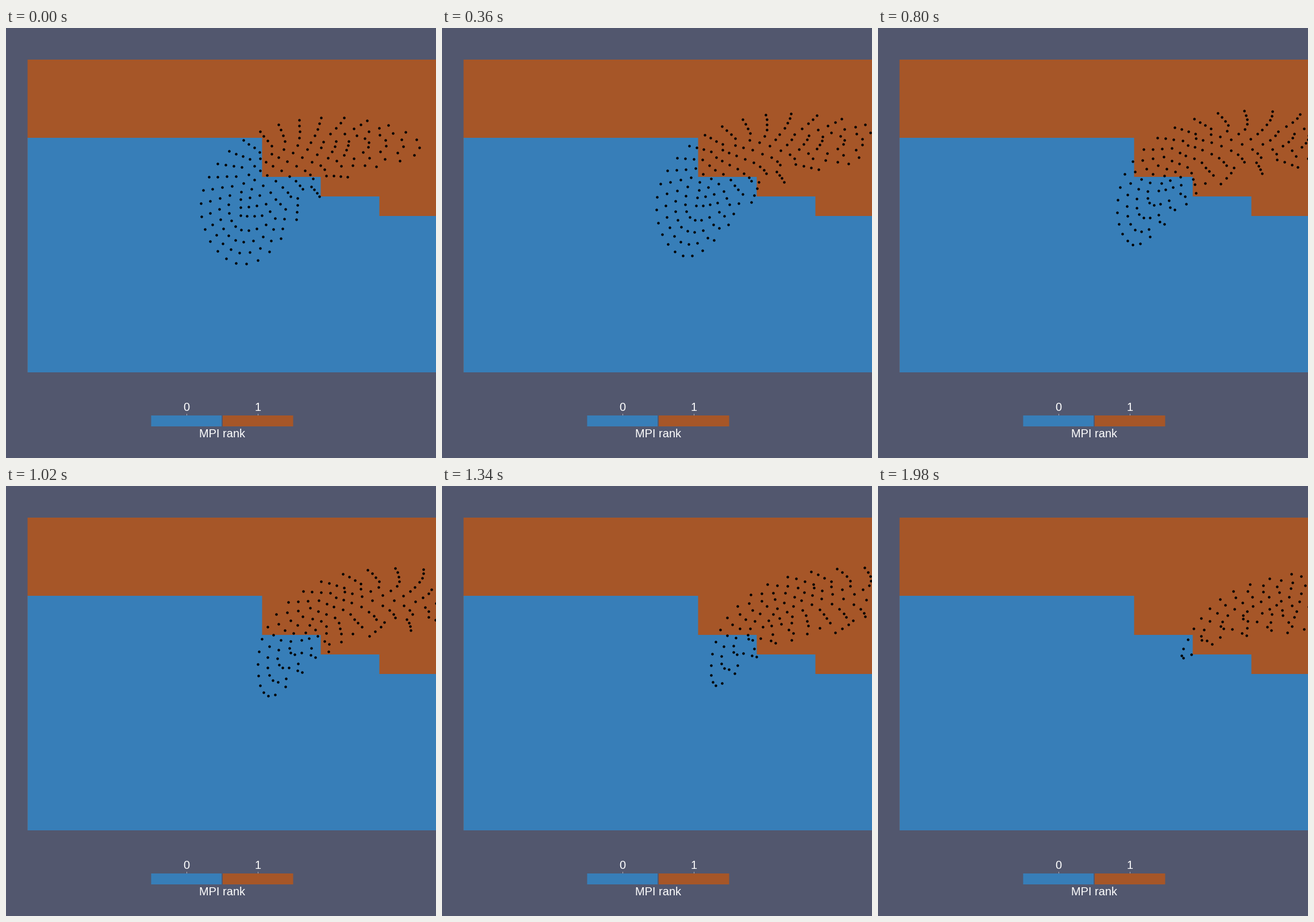
Recreate the animation shown at these times as a matplotlib script. Size 748 by 748 pixels, loop 8000 ms.

```python
import numpy as np
import matplotlib.pyplot as plt
from matplotlib.animation import FuncAnimation
from matplotlib.patches import Polygon, Rectangle

SIZE, DPI = 748, 100
STEP_MS, LOOP_MS, MOVING = 20, 8000, 100
SLATE, BLUE, BROWN = "#52576e", "#377eb8", "#a65628"
LEFT, TOP, CELL = 37.5, 55, 34


def flow(z):
    """Velocity in pixels per step: a channel that narrows to the right."""
    x, y = z.real, z.imag
    peak = 3.12 + 1.05 * np.tanh((x - 545) / 140)
    middle = 196 - 9 * np.tanh((x - 510) / 60)
    curvature = (2.5 + 4.8 * np.exp(-((x - 520) / 80) ** 2)
                 + 17 / (1 + np.exp((660 - x) / 25))) * 1e-5
    u = peak - curvature * (y - middle) ** 2
    lift = 1.75 * np.where(x < 530, np.exp((x - 530) / 175),
                           np.exp(-((x - 530) / 110) ** 2))
    v = -lift * np.sin(np.pi * (y - TOP) / 540) ** 2
    return u + 1j * v


def advect(z, steps):
    """Positions at every step, by the classic Runge-Kutta rule."""
    states = [z]
    for _ in range(steps - 1):
        k1 = flow(z)
        k2 = flow(z + k1 / 2)
        k3 = flow(z + k2 / 2)
        k4 = flow(z + k3)
        z = z + (k1 + 2 * k2 + 2 * k3 + k4) / 6
        states.append(z)
    return states


def smooth_map(sites, values):
    """Cubic radial basis interpolation over the complex plane."""
    n = len(sites)

    def linear(z):
        return np.column_stack([np.ones(len(z)), z.real, z.imag])

    def basis(z):
        return np.hstack([abs(z[:, None] - sites) ** 3, linear(z)])

    system = np.zeros((n + 3, n + 3))
    system[:n] = basis(sites)
    system[n:, :n] = linear(sites).T
    weights = np.linalg.solve(system, np.r_[values, np.zeros(3)])
    return lambda z: basis(z) @ weights


def points(*pairs):
    return np.array(pairs) @ np.array([1, 1j])


# Key points of the stretched disc: rim, inner ring and centre.
RIM = points(
    (368, 236), (343, 282), (340, 328), (355, 371), (383, 401), (418, 410),
    (458, 389), (505, 333), (594, 259), (685, 231), (719, 208), (695, 181),
    (628, 161), (548, 156), (474, 168), (413, 195))
RING = points(
    (424, 228), (389, 291), (399, 345), (452, 342),
    (531, 276), (621, 216), (610, 187), (510, 191))
CENTRE = points((486, 253))


def seed_particles():
    """Cell midpoints of a balanced disc mesh, carried to the stage."""
    spokes = np.exp(1j * np.pi * (0.25 + (np.arange(32) + 0.5) / 16))
    radii = 1 - (np.arange(4) + 0.5) / 8
    sites = np.r_[radii[0] * spokes[1::2], radii[3] * spokes[::4], 0]
    to_stage = smooth_map(sites, np.r_[RIM, RING, CENTRE])

    axis = (np.arange(8) - 3.5) / 4
    a, b = np.meshgrid(axis, axis)
    bend = 0.5 - 0.5 ** 1.5
    core = a * (0.5 - bend * abs(b)) + 1j * b * (0.5 - bend * abs(a))
    return to_stage(np.r_[np.outer(radii, spokes).ravel(), core.ravel()])


states = advect(seed_particles(), MOVING)

fig = plt.figure(figsize=(SIZE / DPI, SIZE / DPI), dpi=DPI, facecolor=SLATE)
ax = fig.add_axes([0, 0, 1, 1])
ax.set(xlim=(0, SIZE), ylim=(SIZE, 0))
ax.axis("off")


def box(x0, y0, x1, y1, color):
    ax.add_patch(Rectangle((x0, y0), x1 - x0, y1 - y0, color=color, lw=0,
                           snap=False))


def label(x, y, text):
    ax.text(x, y, text, color="white", family="Liberation Sans",
            size=20 * 72 / DPI, ha="center", va="baseline")


box(LEFT, TOP, SIZE, TOP + 16 * CELL, BROWN)
stairs = [(0, 16), (0, 4), (12, 4), (12, 6), (15, 6), (15, 7), (18, 7),
          (18, 8), (21, 8), (21, 16)]
ax.add_patch(Polygon([(LEFT + CELL * i, TOP + CELL * j) for i, j in stairs],
                     color=BLUE, lw=0, snap=False))

for x0, x1, color, rank in [(252.5, 375, BLUE, "0"), (377, 499.5, BROWN, "1")]:
    box(x0, 674, x1, 693, color)
    mid = round((x0 + x1) / 2)
    box(mid, 671, mid + 1, 674, "#a9abb7")
    label(mid, 665.5, rank)
label(376, 712, "MPI rank")

dots, = ax.plot([], [], "o", color="black", ms=4.5 * 72 / DPI, mew=0, snap=False)


def draw(frame):
    z = states[min(frame, MOVING - 1)]
    dots.set_data(z.real, z.imag)
    return dots,


anim = FuncAnimation(fig, draw, frames=LOOP_MS // STEP_MS, interval=STEP_MS,
                     repeat=True, repeat_delay=0, blit=True)
plt.show()
```
